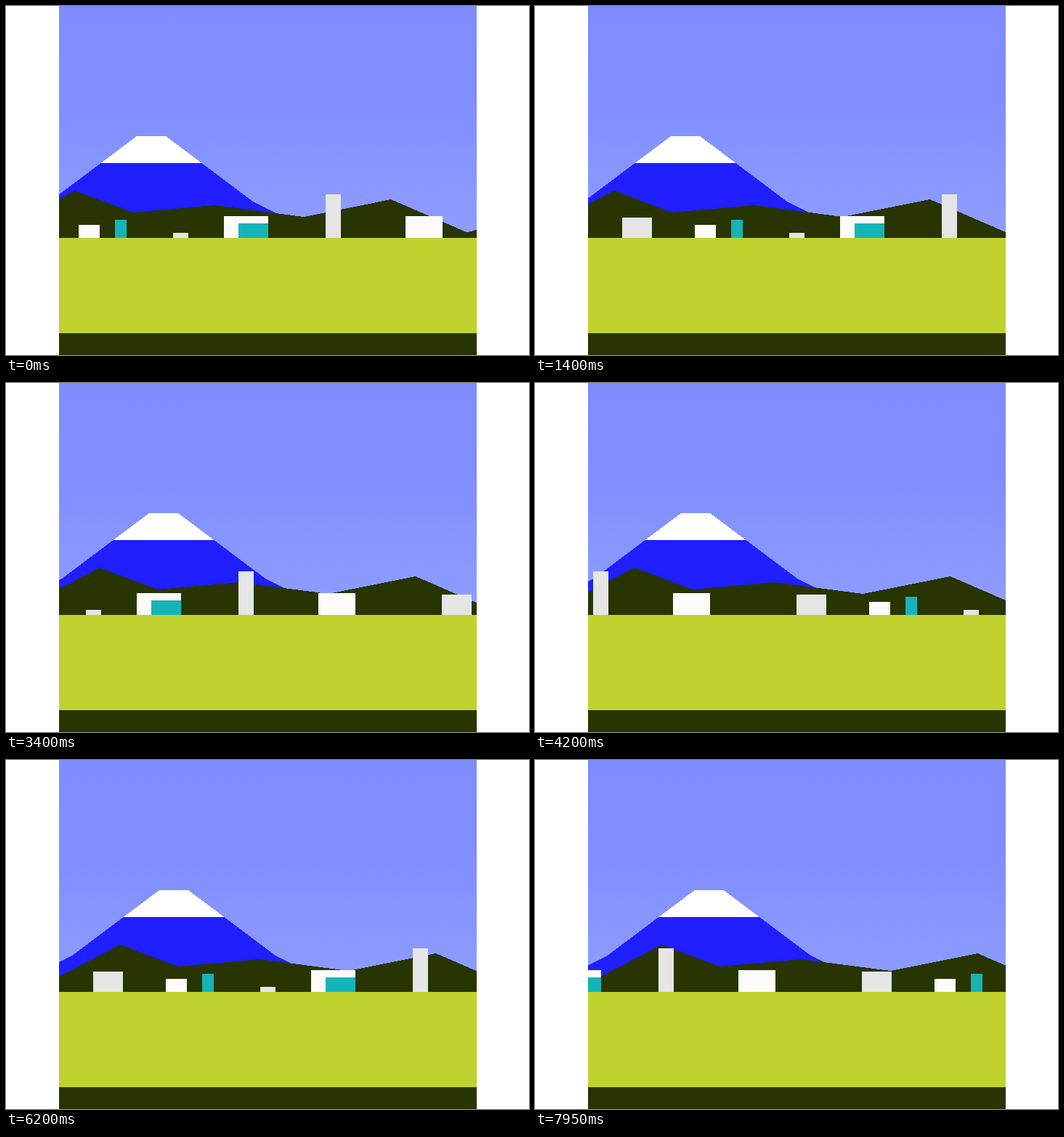
These frames come from a looping animation (720x480 px, 8 s). An HTML page:

```html
<!DOCTYPE html>
<html lang="en">
<head>
<meta charset="utf-8">
<title>Window view</title>
<style>
  html, body { margin: 0; width: 100%; height: 100%; overflow: hidden; background: #fff; }
  svg { display: block; width: 720px; height: 480px; }
</style>
</head>
<body>
<svg viewBox="0 0 720 480" shape-rendering="crispEdges">
  <defs>
    <linearGradient id="sky" gradientUnits="userSpaceOnUse" x1="0" y1="0" x2="0" y2="300">
      <stop offset="0" stop-color="#7f8cff"/>
      <stop offset=".45" stop-color="#7f8eff"/>
      <stop offset="1" stop-color="#8e9cff"/>
    </linearGradient>
    <clipPath id="window"><rect x="73" width="575" height="480"/></clipPath>
  </defs>
  <g clip-path="url(#window)">
    <rect width="720" height="480" fill="url(#sky)"/>
    <g id="mountain">
      <path fill="#1f1fff" d="M-40 319 60 269 180 179H220L340 269 440 319Z"/>
      <path fill="#fff" d="M130.7 216 180 179H220L269.3 216Z"/>
    </g>
    <path id="hills" fill="#283500" d="M-20 330V314L95 254 175 284 287 274 410 290 530 266 635 311.5 680 298V330Z"/>
    <g id="town"></g>
    <rect y="319" width="720" height="131" fill="#c0d22e"/>
    <rect y="450" width="720" height="30" fill="#283500"/>
  </g>
</svg>
<script>
  const STEP = 50, STEPS = 160, TOWN_WIDTH = 720, GROUND = 319;
  const SPEED = { mountain: 0.25, hills: 0.5, town: 30 };
  const WHITE = '#fdfafa', GRAY = '#e5e5e5', TEAL = '#17b4b7';

  // x, top, width, color
  const buildings = [
    [0, 291, 41, GRAY],
    [100, 301, 29, WHITE],
    [150, 294, 16, TEAL],
    [230, 312, 21, GRAY],
    [300, 289, 61, WHITE],
    [320, 299, 41, TEAL],
    [440, 259, 21, GRAY],
    [550, 289, 51, WHITE]
  ];

  const byId = id => document.getElementById(id);
  const mountain = byId('mountain'), hills = byId('hills');

  const blocks = buildings.map(([x, top, width, fill]) => {
    const el = document.createElementNS('http://www.w3.org/2000/svg', 'rect');
    const attrs = { y: top, width, height: GROUND - top, fill };
    for (const name in attrs) el.setAttribute(name, attrs[name]);
    byId('town').append(el);
    return { el, x };
  });

  const shift = (el, x) => el.setAttribute('transform', `translate(${x} 0)`);

  function draw(step) {
    shift(mountain, step * SPEED.mountain);
    shift(hills, step * SPEED.hills);
    for (const { el, x } of blocks) {
      el.setAttribute('x', (x + step * SPEED.town) % TOWN_WIDTH);
    }
  }

  let start;
  function tick(now) {
    start ??= now;
    draw(Math.floor((now - start) / STEP) % STEPS);
    requestAnimationFrame(tick);
  }
  draw(0);
  requestAnimationFrame(tick);
</script>
</body>
</html>
```
